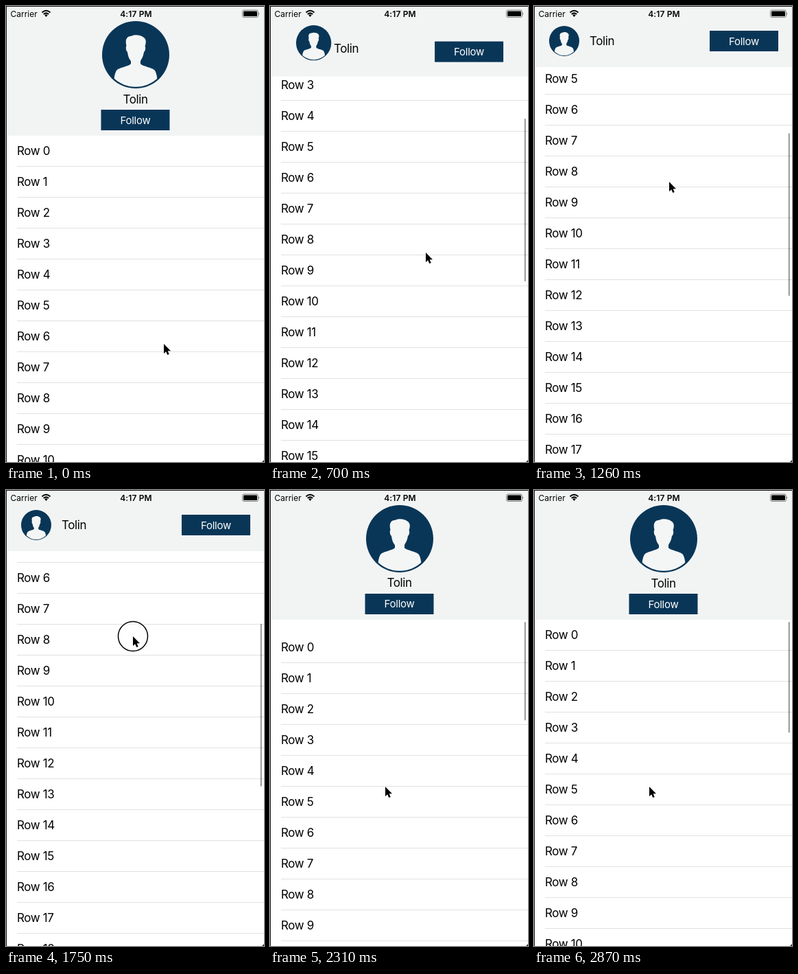
An HTML page that plays this animation: 376x664 px, repeating every 2940 ms.

```html
<!DOCTYPE html>
<html lang="en">
<head>
<meta charset="utf-8">
<title>Collapsing profile header</title>
<style>
  html, body { margin: 0; width: 100%; height: 100%; overflow: hidden; background: #fff; }
  svg { display: block; width: 100%; height: 100%; font-family: Inter, Roboto, sans-serif; }
  .body { font-size: 17px; letter-spacing: -.41px; }
  .button { font-size: 15px; letter-spacing: -.25px; fill: #fff; }
  .status { font-size: 12px; }
  .mid { text-anchor: middle; }
</style>
</head>
<body>
<svg viewBox="0 0 376 664">
  <defs>
    <clipPath id="disc"><circle r="46.8"/></clipPath>
  </defs>
  <rect width="376" height="664" fill="#fff"/>
  <g id="rows"></g>
  <rect id="bar" x="370.6" width="2.4" rx="1.2" fill="#000" opacity=".36"/>
  <rect id="header" width="376" fill="#f2f4f4"/>

  <g id="avatar">
    <circle r="49" fill="#093657"/>
    <g clip-path="url(#disc)" fill="#f4f6f6">
      <path d="M-13.500-13C-16-23-12-27-7-27C-2-30 8-29 12-25C16-22 15-17 13.500-12C15-11 14-5 12-4C11 3 8 7 7 9V13C9 17 24 18 28 23C31 28 32 35 32 50H-32C-32 35-31 28-28 23C-24 18-9 17-7 13V9C-9 7-11 3-12-4C-14-5-15-11-13.500-13Z"/>
    </g>
  </g>
  <text id="name" class="body mid" y="6">Tolin</text>
  <g id="follow">
    <rect width="100" height="30" fill="#093657"/>
    <text class="button mid" x="50" y="20.500">Follow</text>
  </g>

  <g class="status">
    <text x="6.500" y="15.500">Carrier</text>
    <text class="mid" x="189.500" y="15.500" font-weight="600" letter-spacing=".15">4:17 PM</text>
  </g>
  <g fill="none" stroke="#000" stroke-width="2">
    <path d="M52.500 9.500Q58.500 4 64.500 9.500M54.800 12Q58.500 8.700 62.200 12"/>
    <path d="M56.300 13.300Q58.500 11.300 60.700 13.300L58.500 16Z" fill="#000" stroke="none"/>
    <rect x="344.500" y="6" width="23" height="10.500" rx="2.500" stroke="#777" stroke-width="1"/>
    <rect x="346" y="7.500" width="20" height="7.500" rx="1.200" fill="#000" stroke="none"/>
    <path d="M368.500 9.500Q370.500 11.200 368.500 13Z" fill="#777" stroke="none"/>
  </g>
  <path d="M0 0H376V1H1V664H0Z" fill="#111"/>
  <path d="M376 661V664H373Z" fill="#333"/>

  <g id="pointer">
    <circle id="touch" r="21.500" fill="#fff" fill-opacity=".5" stroke="#000" stroke-width="1.500"/>
    <path d="M0 0V14L3.200 11.200L5.300 16L7.700 15L5.700 10.300H10Z" fill="#000" stroke="#fff" stroke-width="1.200" paint-order="stroke" stroke-linejoin="round"/>
  </g>
</svg>
<script>
const LOOP = 2940, STEP = 70;
const ROW = 45, ROWS = 31, STAGE = 664;
const FOLD = 450, COLLAPSE = 358, EXPAND = 1863;
const TAU = 500;

// Pointer tip: time, x, y
const PATH = [
  [0, 230, 492], [70, 230, 490], [290, 229.500, 462], [500, 228, 400], [700, 227, 359],
  [1260, 197, 256], [1680, 186, 214], [1750, 185, 213], [1820, 183, 225],
  [1890, 180, 265], [1960, 175, 338], [2030, 171, 412], [2100, 169, 428], [2310, 168, 432]
];

const $ = id => document.getElementById(id);
const set = (el, attrs) => { for (const k in attrs) el.setAttribute(k, attrs[k]); };
const mix = (a, b, k) => a + (b - a) * k;
const clamp = v => Math.min(1, Math.max(0, v));
const ease = u => (1 - Math.cos(Math.PI * clamp(u))) / 2;
const place = (id, x, y, s = 1) => set($(id), { transform: `translate(${x} ${y}) scale(${s})` });
const glide = dt => 1 - Math.exp(-dt / TAU);

$("rows").innerHTML = Array.from({ length: ROWS }, (_, i) =>
  `<text class="body" x="16" y="${i * ROW + 28}">Row ${i}</text>` +
  `<rect x="16" y="${i * ROW + 44}" width="360" height="1" fill="#e1e1e3"/>`).join("");

// Drag, coast, touch to stop, drag back, coast, bounce
function scrollAt(t) {
  if (t < 70) return 0;
  if (t < 500) return 81.7 * ((t - 70) / 430) ** 2;
  if (t < 1775) return Math.min(253.5, 144.5 + 127.6 * glide(t - 700));
  if (t < 2030) return 253.5 - 108 * ((t - 1775) / 255) ** 2;
  if (t < 2240) return 145.5 - 424 * glide(t - 2030);
  const dt = t - 2240;
  return -0.557 * dt * Math.exp(-0.0109 * dt);
}

function pointerAt(t) {
  const i = PATH.findIndex(p => p[0] > t);
  if (i < 0) return PATH[PATH.length - 1].slice(1);
  const [t0, x0, y0] = PATH[i - 1], [t1, x1, y1] = PATH[i];
  const k = (t - t0) / (t1 - t0);
  return [mix(x0, x1, k), mix(y0, y1, k)];
}

function drawBar(t, top, offset) {
  const folded = t >= COLLAPSE && t < EXPAND;
  const view = STAGE - (folded ? 89 : 189);
  const total = ROWS * ROW;
  const full = view * view / total;
  const travel = (view - 6 - full) * Math.max(0, offset) / (total - view);
  set($("bar"), {
    y: top + 3 + travel,
    height: full + Math.min(0, offset),
    visibility: t < 140 ? "hidden" : "visible"
  });
}

function draw(t) {
  const p = ease((t - COLLAPSE) / FOLD) - ease((t - EXPAND) / FOLD);
  const top = mix(189, 89, p);
  const offset = scrollAt(t);

  place("rows", 0, Math.round(top - offset));
  drawBar(t, top, offset);
  set($("header"), { height: top });
  place("avatar", mix(189, 44, p), mix(71, 51, p), mix(1, 22 / 49, p));
  place("name", mix(188.5, 99, p), mix(135.5, 51, p));
  place("follow", mix(138.5, 256, p), mix(151, 36, p));

  place("pointer", ...pointerAt(t));
  const down = (t >= 70 && t < 500) || (t >= 1680 && t < 1995);
  set($("touch"), { visibility: down ? "visible" : "hidden" });
}

const start = performance.now();
function tick() {
  const t = (performance.now() - start) % LOOP;
  draw(Math.floor(t / STEP) * STEP);
  requestAnimationFrame(tick);
}
tick();
</script>
</body>
</html>
```
